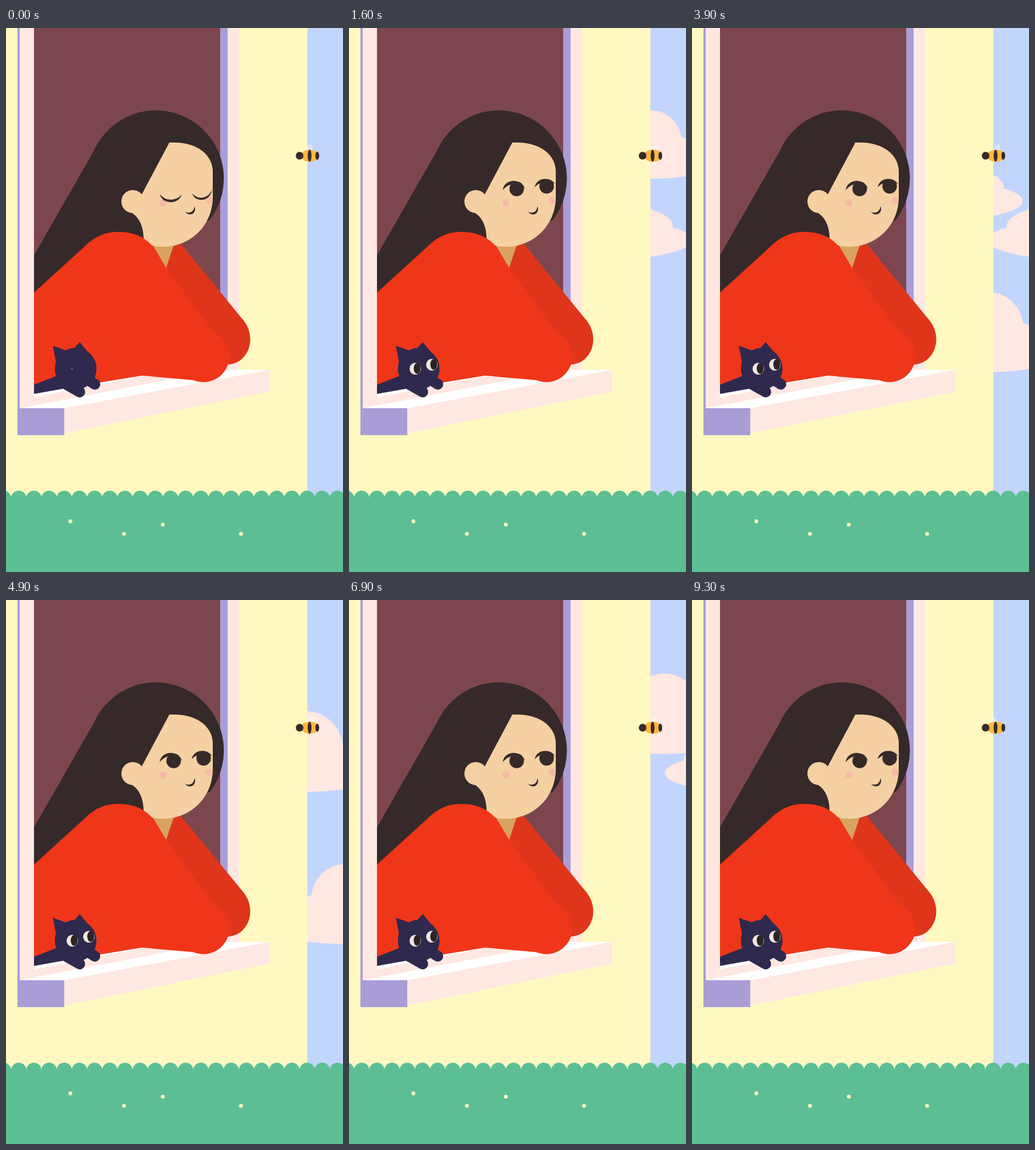
An HTML page that plays this animation: 590x950 px, repeating every 9400 ms.

```html
<!DOCTYPE html>
<html lang="en">
<head>
<meta charset="utf-8">
<title>At the window</title>
<style>
  html, body { margin: 0; width: 100%; height: 100%; overflow: hidden; }
  svg { display: block; width: 590px; height: 950px; }
</style>
</head>
<body>
<svg viewBox="0 0 590 950" xmlns="http://www.w3.org/2000/svg">
  <defs>
    <g id="cloud" fill="#ffe7e2">
      <ellipse rx="133" ry="33"/>
      <ellipse cy="-24.5" rx="100" ry="36"/>
      <circle cy="-44.5" r="63"/>
    </g>
    <g id="catEye">
      <ellipse rx="10" ry="10.3" fill="#f1e6e1"/>
      <ellipse cx="3.3" cy="-.5" rx="6" ry="9.5" fill="#2b2423"/>
    </g>
  </defs>

  <!-- sky, clouds, wall -->
  <rect width="590" height="950" fill="#c2d5fd"/>
  <g id="clouds"></g>
  <rect width="527.5" height="950" fill="#fff9c1"/>

  <!-- window and sill -->
  <path fill="#aa9dd6" d="M20 0H375V711H20Z" clip-path="inset(0 0 0 0)" visibility="hidden"/>
  <path fill="#ffe7e2" d="M24 0H408V597H375L24 664Z"/>
  <path fill="#7d464e" d="M49 0H375V588L238 606L49 640Z"/>
  <path fill="#aa9dd6" d="M20 0H24V664H102V711H20ZM375 0H388V588H375Z"/>
  <path fill="#ffe7e2" d="M102 664L461 597V635L102 708Z"/>
  <path fill="#fff" d="M24 664L375 597H461L102 664ZM49 637L238 604L262 609L238 607.5L49 645Z"/>

  <!-- woman -->
  <path fill="#352a29" d="M49 397L153 216A119 119 0 1 1 357 335L242 372V390L49 475Z"/>
  <path fill="#d8a35f" d="M250 368L298 372L281 421Z"/>
  <path fill="#df361b" d="M280 420L293 381L306 377L412 506C433 528 432 560 414 577C404 587 390 589 372 588L340 520Z"/>
  <g fill="#f5d0a3">
    <circle cx="222" cy="303" r="20"/>
    <path d="M286 200H295C335 200 362 222 362 250V295C362 345 323 382 275 382C260 382 249 380 241 370C241 346 233 330 219 322L225 303L238 290Z"/>
  </g>
  <circle cx="275" cy="305.5" r="6.5" fill="#f6bba6"/>
  <path fill="#f6bba6" d="M361.500 298A6.500 6.500 0 1 0 361.500 304Z"/>
  <g fill="#352a29">
    <path d="M313 320.500C320 325 329 322 330 311C335 322 322 332 313 320.500Z"/>
    <g id="open">
      <circle cx="293.500" cy="281" r="12.700"/>
      <circle cx="346" cy="276.500" r="12.700"/>
      <path d="M269 283C272 262 303 262 308 281C300 270 282 268 269 283ZM325 278C329 259 354 260 361 273C351 266 336 267 325 278Z"/>
    </g>
    <path id="closed" d="M269 290C274 309 303 309 308 290C300 302 280 304 269 290ZM326 289C330 304 358 306 361 281C356 297 338 302 326 289Z"/>
  </g>
  <path fill="#f03618" d="M49 462L135 384C152 367 170 356 196 356C226 356 248 367 262 388L281 420L363 531A43 43 0 0 1 328 615L238 607L165 619L49 632Z"/>

  <!-- cat -->
  <g fill="#2f294e">
    <path d="M49 623L95 605L125 625L100 630L49 639Z"/>
    <circle cx="122" cy="595" r="36.500"/>
    <path d="M82 555L108 564L88 586ZM129 548.500L114 565L156 581Z"/>
    <path fill="none" stroke="#2f294e" stroke-width="19" stroke-linecap="round" d="M105 622L129 635.500M138 611L155.500 622"/>
  </g>
  <g id="catEyes">
    <use href="#catEye" x="116" y="595"/>
    <use href="#catEye" x="145" y="588"/>
  </g>
  <circle id="catDot" cx="115.500" cy="595" r=".8" fill="#f1e6e1"/>

  <!-- bee -->
  <ellipse id="wing" cx="532" cy="211" rx="5.500" ry="8" fill="#fff" opacity=".4"/>
  <ellipse cx="532" cy="223" rx="16" ry="10.500" fill="#fdb73e"/>
  <g fill="#352a29">
    <circle cx="514" cy="223" r="6.700"/>
    <ellipse cx="531.500" cy="223" rx="3.300" ry="10.500"/>
    <ellipse cx="545" cy="223" rx="3.300" ry="7"/>
  </g>

  <!-- hedge -->
  <g id="hedge" fill="#5cbf94"><rect y="820" width="590" height="130"/></g>
  <g fill="#fff9c1">
    <circle cx="112.700" cy="861.500" r="3.400"/>
    <circle cx="206.500" cy="883.300" r="3.400"/>
    <circle cx="274.500" cy="867.300" r="3.400"/>
    <circle cx="411.500" cy="883.300" r="3.400"/>
  </g>
</svg>
<script>
const LOOP = 9400, STEP = 100, BLINK = 200, SPEED = 0.08;
const $ = id => document.getElementById(id);

function add(parent, tag, attrs) {
  const el = document.createElementNS("http://www.w3.org/2000/svg", tag);
  for (const key in attrs) el.setAttribute(key, attrs[key]);
  return parent.appendChild(el);
}

for (let i = 0; i < 23; i++)
  add($("hedge"), "circle", { cx: -4.3 + i * 26.57, cy: 821.5, r: 13.6 });

// x is the centre at the start of the loop
const clouds = [
  { x: 400.5, y: 235, scale: 0.85 },
  { x: 339, y: 370, scale: 1 },
  { x: 205, y: 568, scale: 1 },
  { x: 134, y: 302, scale: 1 },
  { x: 0, y: 236, scale: 1 }
];
for (const c of clouds) c.el = add($("clouds"), "use", { href: "#cloud" });

function show(id, visible) {
  $(id).style.display = visible ? "" : "none";
}

function draw() {
  const t = Math.floor(performance.now() % LOOP / STEP) * STEP;
  for (const c of clouds)
    c.el.setAttribute("transform", `translate(${c.x + t * SPEED} ${c.y}) scale(${c.scale})`);

  const asleep = t < BLINK;
  show("open", !asleep);
  show("closed", asleep);
  show("catEyes", !asleep);
  show("catDot", asleep);

  const tilt = -22 * Math.sin(t / 1000 * 2 * Math.PI);
  $("wing").setAttribute("transform", `rotate(${tilt} 532 223)`);
  requestAnimationFrame(draw);
}
draw();
</script>
</body>
</html>
```
